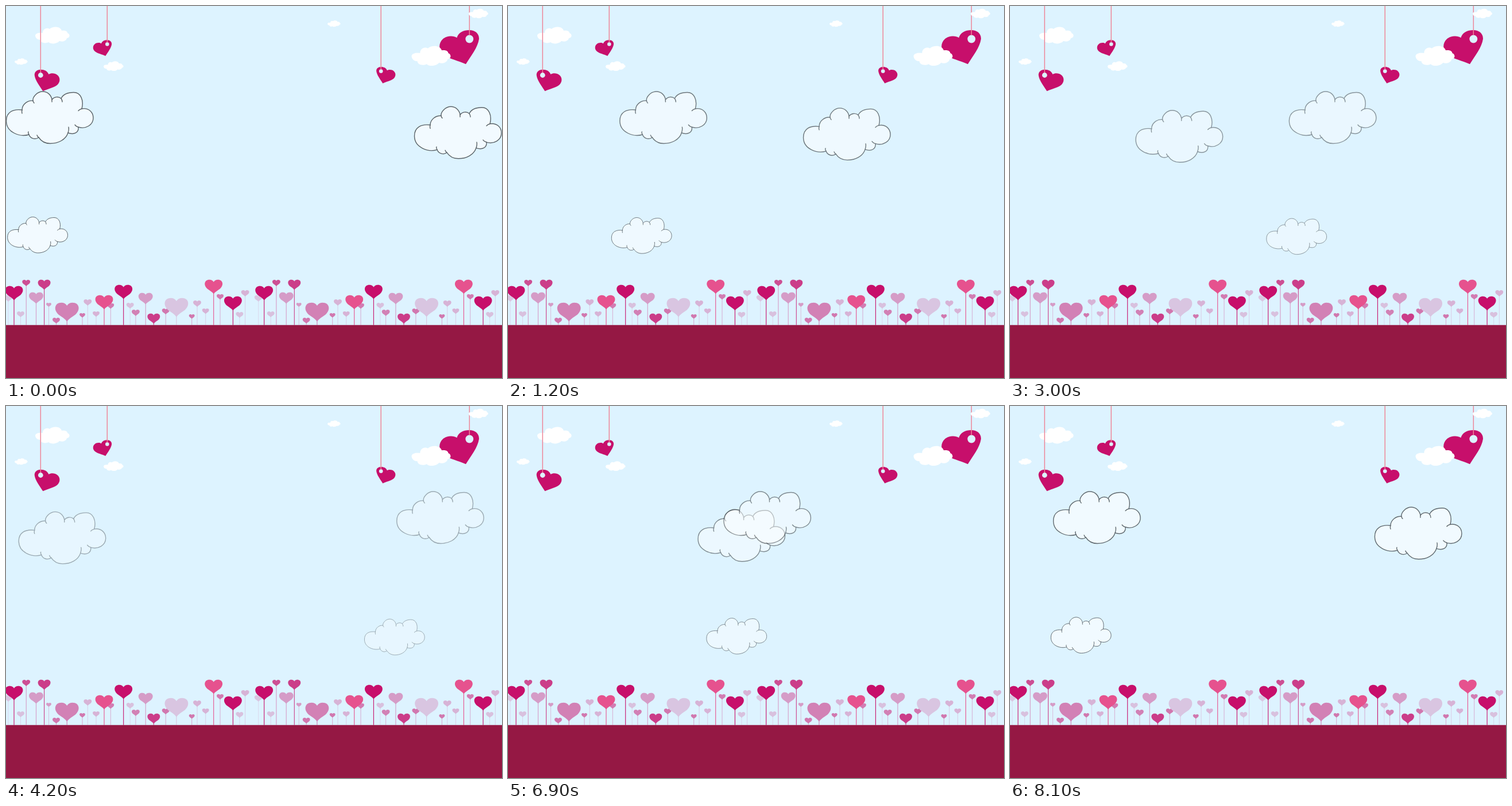
An HTML page that plays this animation: 864 by 648 pixels, repeating every 8.4 s.

```html
<!DOCTYPE html>
<html lang="en">
<head>
<meta charset="utf-8">
<title>Hearts and clouds</title>
<style>
  html, body { margin: 0; height: 100%; overflow: hidden; background: #ddf3ff; }
  svg { display: block; width: 864px; height: 648px; }
</style>
</head>
<body>
<svg viewBox="0 0 864 648">
  <defs>
    <path id="heart" d="M0 12C8 -3 30 -4 42 5C55 17 51 36 36 50C22 60 8 68 0 79C-8 68 -22 60 -36 50C-51 36 -55 17 -42 5C-30 -4 -8 -3 0 12Z"/>
    <g id="tag">
      <path fill="#c70f6b" d="M4 27.8C-1.5 19 -9.5 9 -10.6 0C-11 -6 -6 -9.8 0 -9.8C7 -9.8 12 -7 14 -1.5C18 -4 25 -4 29.5 0C34.5 4.5 34.5 12 29 17C23 22 12 24 4 27.8Z"/>
      <circle r="4.4" fill="#ddf3ff"/>
    </g>
    <path id="puff" fill="#fff" d="M0 15C1 11 7 10 13 11C13 4 20 1 25 4C30 -1 44 -1 46 7C52 6 56 8 56 11C61 13 61 19 55 20C54 25 47 27 42 25C38 30 27 31 23 27C17 30 9 28 9 23C3 23 0 19 0 15Z"/>
    <g id="cloud" stroke="#0c0c0c" stroke-width="1.4" stroke-linecap="round">
      <path fill="#fff" d="M28 33C28 23 38 16 47 17C46 11 54 1 64 1C73 1 79 8 80 15C84 10 91 9 96 13C100 5 109 2.5 118 2.5C130 2.5 136 16 132 31C144 29 152 37 152 47C152 59 139 67 126 63C127 72 119 77 108 73C104 85 91 91.5 77 91.5C68 91.5 61 87 57 81C50 86 42 82 40 76C24 81 1 72 .5 53C0 37 12 31 28 33Z"/>
      <path fill="none" d="M28 33q-1 3 0 6M47 17q0 2 2 4M80 15v4M96 13q2 3 2 6M132 31q-4 1 -6 3.5M126 63q-4 -1 -6 -4M108 73q2 -6 1 -10M57 81q-2 -1 -3 -4M40 76q-2 -3 -1 -5"/>
    </g>
  </defs>
  <g id="scene"></g>
  <use id="right" href="#cloud"/>
  <use id="left" href="#cloud"/>
  <use id="low" href="#cloud"/>
</svg>
<script>
const STEP = 300, STEPS = 28, TURN = 17;
const GROUND = 555.7, BED = 190.7, FIELD = 435.7;
const el = id => document.getElementById(id);
const use = (id, x, y, sx, sy = sx, extra = '') =>
  `<use href="#${id}" transform="translate(${x} ${y}) scale(${sx} ${sy})" ${extra}/>`;

// One bed of flowers, back to front; each further top stands one bed to the right.
const bed = [
  { x: 4, width: 14, tone: 20, tops: [504] },
  { x: 25.5, width: 13, tone: 22, tops: [532, 517, 533] },
  { x: 74.5, width: 9, tone: 38, tops: [517] },
  { x: 142.3, width: 14, tone: 28, tops: [511, 513] },
  { x: 157, width: 12, tone: 28, tops: [532, 527] },
  { x: 87.5, width: 13, tone: 54, tops: [543, 527] },
  { x: 133, width: 10, tone: 54, tops: [535, 537] },
  { x: 182.3, width: 12, tone: 52, tops: [518, 502] },
  { x: 52.5, width: 25, tone: 38, tops: [499, 500] },
  { x: 106.2, width: 41, tone: 50, fade: 30, tops: [517, 509] },
  { x: 35.2, width: 14, tone: 72, fade: 22, tops: [477, 529, 495] },
  { x: 66.6, width: 22, tone: 80, tops: [477, 536] },
  { x: 171, width: 31, ink: '#e6528e', tone: 100, tops: [504, 477] },
  { x: 14, width: 31, tone: 100, tops: [488, 486, 506] }
];

function flower(x, top, width, ink, tone) {
  const color = `color-mix(in srgb, ${ink} ${tone}%, #ddf3ff)`;
  const stem = width < 15 ? .6 : 1.1;
  return `<path d="M${x} ${top + width / 2}V${GROUND}" style="stroke:${color}" stroke-width="${stem}"/>`
    + use('heart', x, top, width / 100, width / 100, `style="fill:${color}"`);
}

const field = offset => bed.map(({ x, width, tone, fade = 0, ink = '#c70f6b', tops }) =>
  tops.map((top, i) => flower(x + offset + i * BED, top, width, ink, tone - i * fade)).join('')
).join('');

function hanging(x, y, scale, side) {
  return use('tag', x, y, scale * side, scale)
    + `<path d="M${x} 0V${y - 4.4 * scale}" stroke="#ee8798" stroke-width="1.5"/>`;
}

el('scene').innerHTML =
  use('puff', 51, 36, 1) + use('puff', 15, 91, .38) + use('puff', 170, 96, .58) + use('puff', 560, 25, .38)
  + hanging(60.3, 120.5, 1, 1) + hanging(176.3, 66.5, .74, -1)
  + hanging(653.2, 113.5, .76, 1) + hanging(807.3, 57.5, 1.57, -1)
  + use('puff', 706.5, 69, 1.14, 1.19) + use('puff', 806, 4.5, .57)
  + field(0) + field(FIELD)
  + `<path fill="#951844" d="M0 ${GROUND}H864V648H0Z"/>`;

function place(id, x, y, scale, opacity) {
  el(id).setAttribute('transform', `translate(${x} ${y}) scale(${scale})`);
  el(id).setAttribute('opacity', opacity);
}

// The clouds drift across and fade, then return a little faster.
function draw(now) {
  const n = Math.floor(now / STEP) % STEPS;
  const p = n < TURN ? n / TURN : (STEPS - n) / (STEPS - TURN);
  const opacity = .62 - .37 * p;
  place('left', 826 * p, 148, 1, opacity);
  place('right', 711 - 837 * p, 174.3 + 11 * p, 1, opacity);
  place('low', 2.3 + 755 * p, 366.8 + 4.4 * p, .692, opacity);
}

const start = performance.now();
(function tick() {
  draw(performance.now() - start);
  requestAnimationFrame(tick);
})();
</script>
</body>
</html>
```
